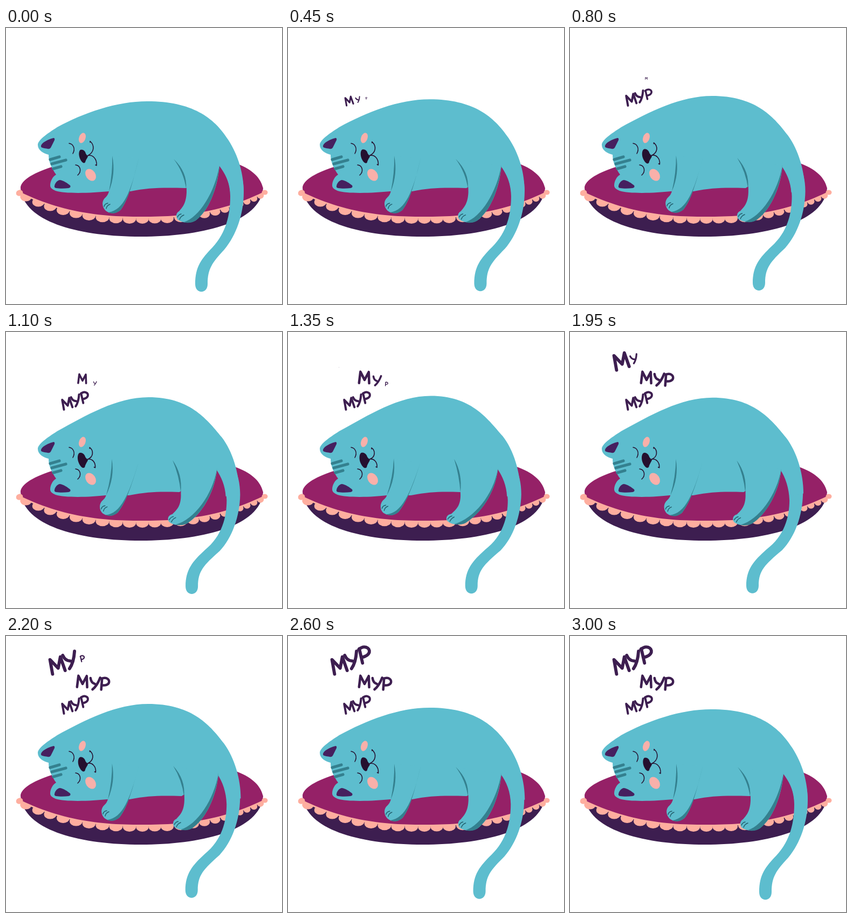
An HTML page with a canvas that plays this animation: 512x512 px, repeating every 3.05 s.

```html
<!DOCTYPE html>
<html lang="ru">
<head>
<meta charset="utf-8">
<title>Мур</title>
<style>
html, body { margin: 0; width: 100%; height: 100%; overflow: hidden; background: #fff; }
canvas { display: block; width: 512px; height: 512px; }
</style>
</head>
<body>
<canvas id="stage" width="512" height="512" role="img" aria-label="Мур мур мур"></canvas>
<script>
const ctx = document.getElementById('stage').getContext('2d');
const LOOP = 3050, STEP = 50, BREATH = 3000, TAIL_PEAK = 1750, GROW = 510;
const CAT = '#5dbdce', SHADE = '#34808f', PLUM = '#3d1e50', MAGENTA = '#952167',
      TRIM = '#feae9f', CHEEK = '#f9b0aa', EAR = '#46205f', INK = '#25102f';

// Each part: the path breathed out and the path breathed in.
const body = [
  'M79 235C70 233 59 227 59 217C59 208 75 197 95 184C145 157 205 136 262 136C345 136 386 166 412 207C432 238 441 272 441 305L416 305C415 285 405 268 396 256L334 297C290 296 265 296 231 303L191 303C160 306 110 308 92 302C85 299 82 296 82 292C82 284 87 275 93 272C86 262 79 250 79 235Z',
  'M79 235C70 233 59 227 59 217C59 208 75 197 95 184C150 154 205 118 265 118C338 118 368 158 398 193C418 218 431 260 431 298L406 305C405 285 398 268 389 255L319 297C285 296 265 296 228 303L183 303C160 306 110 308 92 302C85 299 82 296 82 292C82 284 87 275 93 272C86 262 79 250 79 235Z'];
const tail = [
  'M396 256L425 245C437 265 441 285 441 305C441 345 427 385 405 411C382 436 374 447 374 475C374 494 351 494 351 475C351 442 363 428 383 407C409 379 416 345 416 312C416 290 408 270 396 256Z',
  'M389 255L418 242C427 262 431 280 431 300C430 340 416 380 392 404C359 431 347 442 347 470C347 489 324 489 324 470C324 440 338 424 362 403C397 378 406 342 406 312C405 290 399 270 389 255Z'];
const hindLeg = [
  'M311 243C328 262 336 285 335 305C334 325 328 332 321 340C315 343 315 350 318 355C325 361 340 364 352 357C375 340 392 300 396 256Z',
  'M308 235C318 255 320 278 319 297C321 322 310 330 302 337C292 339 291 346 294 350C300 357 315 359 328 354C355 338 384 300 389 254Z'];
const hindShade = [
  'M396 254C392 300 375 340 352 357C345 362 336 362 330 360C358 352 388 304 396 254ZM311 243Q337 268 334 298Q330 268 311 243Z',
  'M389 253C384 300 355 338 328 354C320 358 312 357 307 356C344 346 381 302 389 253ZM308 235Q323 262 319 297Q317 266 308 235Z'];
const hindToes = [
  'M318 351Q320 346 325 345M322 355Q324 349 330 347',
  'M295 347Q298 342 303 341M299 351Q302 345 307 343'];
const frontLeg = [
  'M197 237C202 262 198 285 191 303C189 310 187 312 182 317C177 324 179 333 185 339C192 345 205 345 213 337C228 318 238 275 246 242Z',
  'M196 235C199 262 194 285 183 303C181 308 179 309 175 313C170 319 170 329 176 335C184 341 197 341 205 333C222 312 235 275 245 243Z'];
const frontShade = [
  'M246 242C238 275 228 318 213 337C205 345 196 345 190 342C218 338 232 304 246 242ZM197 237Q204 270 191 303Q198 268 197 237Z',
  'M245 243C235 275 222 312 205 333C197 341 188 341 182 338C210 337 227 298 245 243ZM196 235Q201 270 183 303Q195 268 196 235Z'];
const frontToes = [
  'M182 331Q183 326 189 325M186 335Q187 329 193 327',
  'M174 327Q175 322 181 321M178 331Q179 325 185 323'];
const nose = [
  'M138 226C135 228 134 236 138 244C141 250 145 252 147 249C148 244 152 240 152 238C150 236 148 234 147 230C145 226 141 225 138 226Z',
  'M136 224C132 226 131 236 135 244C139 252 143 254 146 251C147 245 152 239 152 237C150 235 147 233 146 229C143 224 139 223 136 224Z'];
const mouth = [
  'M151 237C164 231 165 218 156 210L156 212M151 237C160 234 169 242 168 255L166 254',
  'M151 236C163 232 162 220 155 215L155 217M151 236C159 234 166 241 165 251L163 250'];

// x of every scallop along the trim
const scallops = [37, 60, 82, 106, 130, 154, 179, 204, 229, 253, 276, 299, 324, 347, 368, 388, 406, 421, 434, 447, 460, 472];

// Hand-lettered strokes, one unit high and centred
const letters = {
  М: 'M-.36 .46L-.34 -.42L.04 .18L.3 -.46L.42 .4',
  У: 'M-.38 -.36Q-.3 0 0 .06M.36 -.46Q.18 .2 -.14 .5',
  Р: 'M-.22 -.42L-.2 .46M-.26 -.38C.1 -.6 .44 -.36 .32 -.08Q.2 .12 -.18 .12'
};
const words = [
  { start: 50, gap: 150, size: 21, tilt: -.2, at: [[113, 133], [130, 127], [145.5, 121.5]] },
  { start: 700, gap: 245, size: 24, tilt: .1, at: [[141.5, 84.5], [165, 87.5], [182.5, 89]] },
  { start: 1340, gap: 335, size: 31, tilt: -.2, at: [[94.5, 54.5], [119, 44.5], [141.5, 35]] }
];

const clamp = v => Math.max(0, Math.min(1, v));
const trimY = x => 350 - 47 * Math.abs((x - 252) / 228) ** 2.4;

function mix([a, b], k) {
  const number = /-?\d+/g, ends = b.match(number);
  let i = 0;
  return a.replace(number, v => +v + (ends[i++] - v) * k);
}

function fill(path, color) {
  ctx.fillStyle = color;
  ctx.fill(new Path2D(path));
}

function line(path, color, width) {
  ctx.strokeStyle = color;
  ctx.lineWidth = width;
  ctx.stroke(new Path2D(path));
}

function oval(x, y, rx, ry, color, turn = 0) {
  ctx.fillStyle = color;
  ctx.beginPath();
  ctx.ellipse(x, y, rx, ry, turn, 0, 2 * Math.PI);
  ctx.fill();
}

function cushion() {
  fill('M28 304C40 362 140 387 250 387C360 387 464 362 476 304Z', PLUM);
  scallops.forEach((x, i) => {
    const next = scallops[i + 1] ?? x + 13, prev = scallops[i - 1] ?? x - 20;
    const r = (next - prev) / 4;
    oval(x, trimY(x) + 4, r, 2.5 + r * .55, TRIM);
  });
  let edge = '';
  for (let x = 476; x >= 28; x -= 8) edge += `L${x} ${trimY(x)}`;
  line('M' + edge.slice(1), TRIM, 6);
  fill('M27 297C27 268 130 235 252 235C405 228 468 256 477 297' + edge + 'Z', MAGENTA);
  oval(25, 306, 6.5, 5.5, TRIM, -.4);
  oval(480, 305, 5.5, 4.5, TRIM);
}

function face(breath) {
  fill('M65 219C66 212 80 206 88 204Q91 204 90 208L83 222Q81 225 77 224C70 223 64 222 65 219Z', EAR);
  fill('M90 293C91 287 96 282 100 282C107 283 114 288 119 292Q121 296 116 297C108 298 99 298 93 297Q89 296 90 293Z', EAR);
  line('M82 244L99 239M85 252L111 245M88 261L102 257', SHADE, 5.2);
  line('M117 214C125 215 129 224 124 233M129 254C138 255 141 266 133 273', INK, 1.5);
  oval(141.5, 204, 6, 9.8, CHEEK, .35);
  oval(157, 272.5, 8.8, 12, CHEEK, -.6);
  line(mix(mouth, breath), INK, 1.6);
  fill(mix(nose, breath), INK);
}

function purr(t) {
  for (const { start, gap, size, tilt, at } of words) {
    at.forEach(([x, y], i) => {
      const k = clamp((t - start - i * gap) / GROW);
      if (!k) return;
      ctx.save();
      ctx.translate(x, y + 11 * (1 - k));
      ctx.rotate(tilt);
      ctx.scale(size * k, size * k);
      line(letters['МУР'[i]], PLUM, .19);
      ctx.restore();
    });
  }
}

function draw(t) {
  const breath = (1 - Math.cos(2 * Math.PI * t / BREATH)) / 2;
  const stretch = breath ** 2.3;
  const u = t < TAIL_PEAK ? t / TAIL_PEAK : (BREATH - t) / (BREATH - TAIL_PEAK);
  const swing = (u + (1 - Math.cos(Math.PI * u)) / 2) / 2;

  ctx.fillStyle = '#fff';
  ctx.fillRect(0, 0, 512, 512);
  ctx.lineCap = ctx.lineJoin = 'round';
  cushion();
  fill(mix(tail, swing), CAT);
  fill(mix(body, breath), CAT);
  for (const [leg, shade, toes] of [[hindLeg, hindShade, hindToes], [frontLeg, frontShade, frontToes]]) {
    fill(mix(leg, stretch), CAT);
    fill(mix(shade, stretch), SHADE);
    line(mix(toes, stretch), '#24606e', 1.5);
  }
  face(breath);
  purr(t);
}

function tick() {
  draw(Math.floor(performance.now() % LOOP / STEP) * STEP);
  requestAnimationFrame(tick);
}
tick();
</script>
</body>
</html>
```
